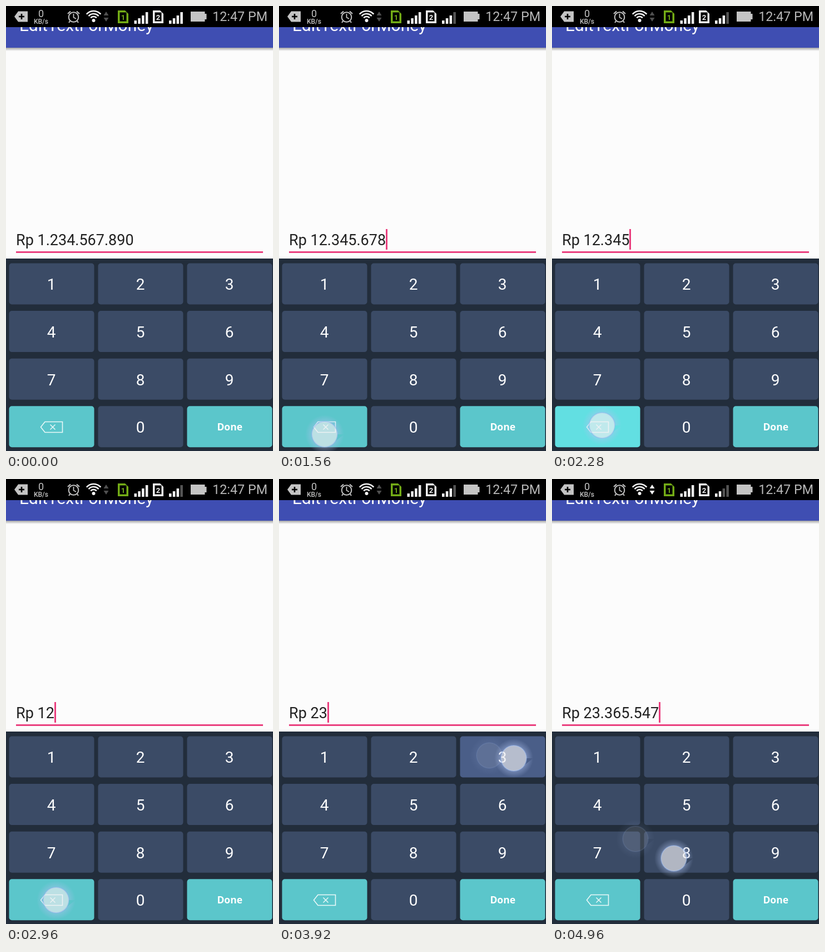
These frames come from a looping animation (480x800 px, 5 s). An HTML page with a canvas:

```html
<!DOCTYPE html>
<html lang="en">
<head>
<meta charset="utf-8">
<title>Money field</title>
<style>
  html, body { margin: 0; width: 100%; height: 100%; overflow: hidden; background: #000; }
  canvas { display: block; width: 480px; height: 800px; }
</style>
</head>
<body>
<canvas id="stage" width="480" height="800"></canvas>
<script>
const ctx = document.getElementById('stage').getContext('2d');
const LOOP = 5000;
const PRESS_DELAY = 30;
const KEYS = ['1', '2', '3', '4', '5', '6', '7', '8', '9', 'del', '0', 'Done'];

// Each tap: key, finger down, finger up, x, y
const taps = [
  ['del', 1320, 1390, 80, 768], ['del', 1470, 1555, 82, 770],
  ['del', 1680, 1780, 84, 764], ['del', 1880, 1970, 87, 760],
  ['del', 2060, 2150, 88, 757], ['del', 2240, 2340, 90, 754],
  ['del', 2480, 2560, 90, 755], ['del', 2700, 2800, 90, 756],
  ['del', 2935, 3030, 90, 757], ['del', 3150, 3240, 92, 758],
  ['2', 3470, 3590, 250, 505], ['3', 3740, 3840, 378, 497],
  ['3', 3885, 3980, 422, 502], ['6', 4030, 4115, 410, 588],
  ['5', 4220, 4310, 258, 590], ['5', 4400, 4490, 252, 592],
  ['4', 4665, 4750, 106, 590], ['7', 4800, 4880, 150, 647],
  ['8', 4940, 5040, 219, 682]
].map(([key, down, up, x, y]) => ({ key, down, up, x, y }));

function rect(x, y, w, h, color, radius = 0) {
  ctx.fillStyle = color;
  ctx.beginPath();
  ctx.roundRect(x, y, w, h, radius);
  ctx.fill();
}

function label(text, x, y, font, color, align = 'center') {
  ctx.font = font;
  ctx.fillStyle = color;
  ctx.textAlign = align;
  ctx.fillText(text, x, y);
}

function path(points, close) {
  ctx.beginPath();
  points.forEach(([x, y]) => ctx.lineTo(x, y));
  if (close) ctx.closePath();
}

function line(points, color, width, close) {
  path(points, close);
  ctx.strokeStyle = color;
  ctx.lineWidth = width;
  ctx.stroke();
}

function shape(points, color) {
  path(points, true);
  ctx.fillStyle = color;
  ctx.fill();
}

function arc(x, y, r, from, to, color, width) {
  ctx.beginPath();
  ctx.arc(x, y, r, from, to);
  ctx.strokeStyle = color;
  ctx.lineWidth = width;
  ctx.stroke();
}

function signal(x, strength) {
  [6, 10, 15, 21].forEach((h, i) =>
    rect(x + i * 6.8, 32 - h, 4.5, h, i < strength ? '#f4f4f4' : '#555'));
}

function sim(x, digit, color) {
  shape([[x, 8], [x + 13, 8], [x + 19, 14], [x + 19, 31], [x, 31]], color);
  rect(x + 3.5, 11.5, 12, 16, '#000');
  label(digit, x + 9.5, 24.5, 'bold 13px Roboto, sans-serif', color);
}

function statusBar(t) {
  const gray = '#c4c4c4';
  rect(0, 0, 480, 38, '#000');
  shape([[15, 19], [22, 9.5], [39, 9.5], [39, 28.5], [22, 28.5]], gray);
  rect(23, 17.7, 10, 2.6, '#000');
  rect(26.7, 14, 2.6, 10, '#000');
  label('0', 63, 20, '18px Roboto, sans-serif', gray);
  label('KB/s', 63, 32, '500 12px Roboto, sans-serif', gray);

  arc(121.5, 20, 8.8, 0, 7, gray, 2);
  line([[121.5, 14], [121.5, 20.5], [126, 23]], gray, 1.8);
  line([[111, 14], [116, 9.5]], gray, 2.2);
  line([[127, 9.5], [132, 14]], gray, 2.2);
  line([[115, 27], [113, 30]], gray, 2);
  line([[128, 27], [130, 30]], gray, 2);

  [7, 12, 17].forEach(r => arc(157.5, 26, r, -Math.PI * .77, -Math.PI * .23, '#f4f4f4', 2.6));
  ctx.beginPath();
  ctx.arc(157.5, 26, 3, 0, 7);
  ctx.fillStyle = '#f4f4f4';
  ctx.fill();

  const arrows = t >= 4320 ? '#f4f4f4' : '#505050';
  shape([[175.5, 17], [180, 10], [184.5, 17]], arrows);
  shape([[175.5, 21], [180, 28], [184.5, 21]], arrows);

  sim(201, '1', '#74ad16');
  signal(230.5, 4);
  sim(264, '2', '#f4f4f4');
  signal(293, t < 200 ? 4 : t < 4320 ? 3 : 2);
  rect(332, 10, 25.5, 18, gray);
  rect(357, 14, 3.5, 10, gray);
  label('12:47 PM', 470, 27, '23.3px Roboto, sans-serif', '#b8b8b8', 'right');
}

function appBar() {
  rect(0, 0, 480, 454, '#fcfcfc');
  const shadow = ctx.createLinearGradient(0, 75, 0, 81);
  shadow.addColorStop(0, 'rgba(0,0,0,.34)');
  shadow.addColorStop(1, 'rgba(0,0,0,0)');
  rect(0, 75, 480, 6, shadow);
  rect(0, 38, 480, 37, '#3f4eb2');
  label('EditTextForMoney', 24, 45, '30px Roboto, sans-serif', '#fff', 'left');
}

function amountAt(t) {
  let digits = '1234567890';
  for (const tap of taps) {
    if (tap.up > t) break;
    digits = tap.key === 'del' ? digits.slice(0, -1) : digits + tap.key;
  }
  return 'Rp ' + digits.replace(/\B(?=(\d{3})+$)/g, '.');
}

function field(t) {
  const text = amountAt(t), pink = '#ea407f';
  label(text, 18, 430, '27px Roboto, sans-serif', '#212121', 'left');
  const end = 18 + ctx.measureText(text).width;
  rect(18, 441, 444, 3, pink);
  const cursorOn = t >= 1120 || (t >= 120 && t < 640);
  if (cursorOn) rect(Math.round(end), 401, 3, 37, pink);
}

function backspace() {
  line([[62.5, 757], [70, 747.5], [101.5, 747.5], [101.5, 766.5], [70, 766.5]], '#e9f8f8', 1.6, true);
  line([[79.5, 752.5], [88.5, 761.5]], '#e9f8f8', 1.5);
  line([[88.5, 752.5], [79.5, 761.5]], '#e9f8f8', 1.5);
}

function keypad(t) {
  rect(0, 454, 480, 346, '#222d3b');
  const held = taps.find(tap => t >= tap.down + PRESS_DELAY && t < tap.up);
  KEYS.forEach((key, i) => {
    const x = 5.5 + i % 3 * 160, y = 462.5 + Math.floor(i / 3) * 85.6;
    const pressed = held && held.key === key;
    const teal = key === 'del' || key === 'Done';
    const color = teal ? (pressed ? '#62dfe2' : '#5bc6cb') : (pressed ? '#4a5e88' : '#3b4b66');
    rect(x, y, 153, 74, color, 5);
    if (key === 'del') backspace();
    else if (key === 'Done') label(key, x + 76.7, 763, 'bold 17.5px "Open Sans", sans-serif', '#fff');
    else label(key, x + 76, y + 47.8, '28px Roboto, sans-serif', '#fff');
  });
}

function touch({ x, y }, alpha) {
  ctx.globalAlpha = alpha;
  const halo = ctx.createRadialGradient(x, y, 22, x, y, 35);
  halo.addColorStop(0, 'rgba(175,195,240,.42)');
  halo.addColorStop(1, 'rgba(175,195,240,0)');
  ctx.beginPath();
  ctx.arc(x, y, 35, 0, 7);
  ctx.arc(x, y, 22, 0, 7, true);
  ctx.fillStyle = halo;
  ctx.fill('evenodd');
  ctx.beginPath();
  ctx.arc(x, y, 23, 0, 7);
  ctx.fillStyle = 'rgba(238,238,242,.66)';
  ctx.fill();
  arc(x, y, 23, 0, 7, 'rgba(140,175,235,.4)', 2);
  ctx.globalAlpha = 1;
}

function touches(t) {
  for (const tap of taps) {
    const since = t - tap.up;
    if (t < tap.down || since > 150) continue;
    touch(tap, since < 30 ? 1 : .4 * (1 - since / 150));
  }
}

function draw(now) {
  const t = now % LOOP;
  appBar();
  statusBar(t);
  field(t);
  keypad(t);
  touches(t);
}

const start = performance.now();
function tick() {
  draw(performance.now() - start);
  requestAnimationFrame(tick);
}
tick();
</script>
</body>
</html>
```
